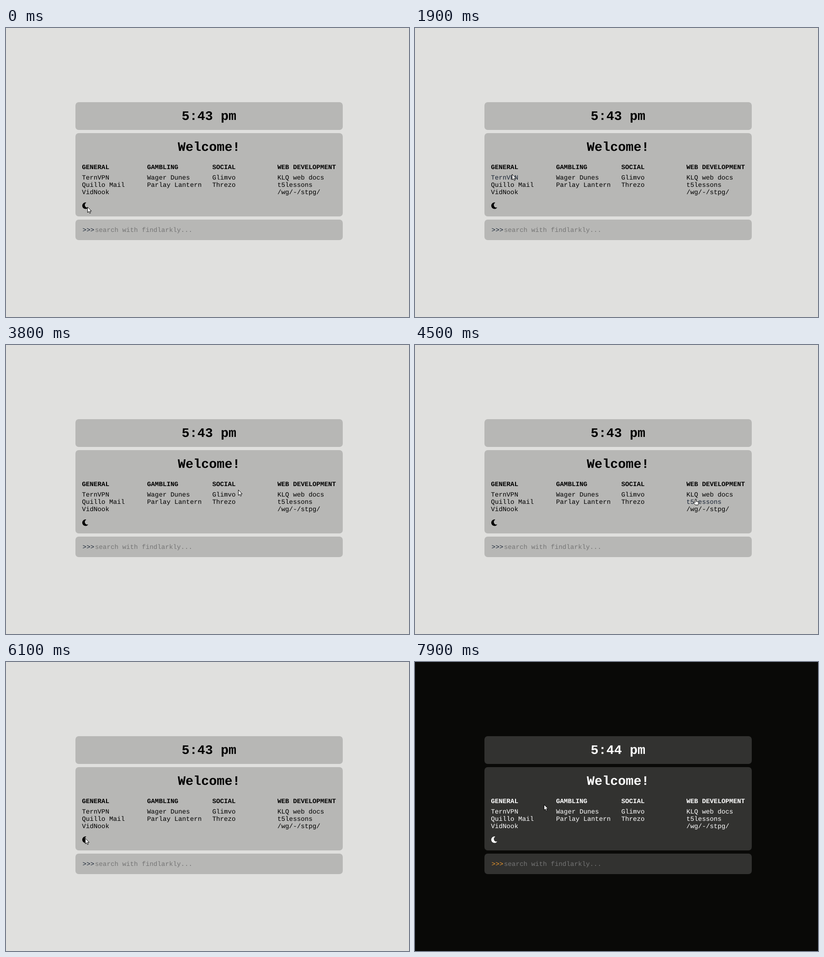
Animation of 882 by 635 pixels, one loop 8 s. Source, as an HTML page:

```html
<!DOCTYPE html>
<html lang="en">
<head>
<meta charset="utf-8">
<title>Start page</title>
<style>
  html, body { margin: 0; width: 100%; height: 100%; overflow: hidden; }
  svg {
    --bg: #e0e0de; --box: #b7b7b5; --ink: #000; --accent: #1a2536;
    display: block; background: var(--bg); fill: var(--ink);
    font: 14.222px "Liberation Mono", monospace;
    text-rendering: geometricPrecision;
  }
  svg.dark { --bg: #090907; --box: #323230; --ink: #fff; --accent: #f09a2c; }
  .box { fill: var(--box); }
  .big { font-size: 28.444px; font-weight: bold; text-anchor: middle; }
  .head { font-weight: bold; }
  .hover, .prompt { fill: var(--accent); }
  .hint { fill: #757575; }
  .cursor { fill: #fff; stroke: #000; stroke-linejoin: round; }
</style>
</head>
<body>
<svg id="stage" width="882" height="635" viewBox="0 0 882 635">
  <rect class="box" x="152" y="163" width="585" height="61" rx="7.1"/>
  <rect class="box" x="152" y="231" width="585" height="183" rx="7.1"/>
  <rect class="box" x="152" y="421" width="585" height="45" rx="7.1"/>
  <text id="clock" class="big" x="444.3" y="202">5:43 pm</text>
  <text class="big" x="444.3" y="270">Welcome!</text>
  <g id="columns"></g>
  <path transform="translate(166.1 383.3) scale(.02778)"
    d="M283 512c79 0 151-36 199-95 7-9-1-21-12-19-124 24-238-72-238-197 0-72 39-139 102-174 9-6 7-21-4-23A258 258 0 0 0 283 0a256 256 0 0 0 0 512z"/>
  <text class="prompt" x="167.6" y="448">&gt;&gt;&gt;</text>
  <text class="hint" x="194.8" y="448">search with findlarkly...</text>
  <g id="pointer" class="cursor">
    <path id="arrow" d="M0 0V12L2.8 9.5L4.7 13.7L6.7 12.8L4.9 8.7H8.6Z"/>
    <path id="hand" d="M-1.5 7V.6Q-1.5-.6-.3-.6T.9 .6V4.2L5.3 5.1Q6.6 5.5 6.5 7L5.9 9.6L5 12H-.8L-4.4 7.8Q-5 6.6-3.9 6.1Q-3 5.8-1.5 7Z"/>
  </g>
</svg>
<script>
const LOOP = 8000, DARK_AT = 6600, MINUTE_AT = 7900;
const CHAR = 8.534, ROW = 16, LEFT = 166.2, COLUMN = 142.6;

const columns = [
  ["GENERAL", "TernVPN", "Quillo Mail", "VidNook"],
  ["GAMBLING", "Wager Dunes", "Parlay Lantern"],
  ["SOCIAL", "Glimvo", "Threzo"],
  ["WEB DEVELOPMENT", "KLQ web docs", "t5lessons", "/wg/-/stpg/"]
];

// turning points of the pointer: time, x, y
const path = [
  [0, 178, 393], [1200, 178, 393], [1800, 207, 339], [1900, 212, 321],
  [2100, 236, 313], [3000, 377, 358], [3900, 525, 317], [4400, 607, 337.5],
  [4500, 614, 339], [4800, 632, 360], [5700, 197, 403], [6100, 173, 387],
  [6700, 173, 387], [7000, 182, 376], [7200, 200, 343], [7700, 235, 318],
  [7800, 235, 318], [7900, 282, 313]
];

const $ = id => document.getElementById(id);
const links = [];

function addText(x, y, str, cls) {
  const el = document.createElementNS("http://www.w3.org/2000/svg", "text");
  el.setAttribute("x", x);
  el.setAttribute("y", y);
  if (cls) el.setAttribute("class", cls);
  el.textContent = str;
  $("columns").append(el);
  return el;
}

columns.forEach(([title, ...items], c) => {
  const x = LEFT + c * COLUMN;
  addText(x, 310, title, "head");
  items.forEach((str, i) => {
    const y = 333 + i * ROW;
    links.push({ el: addText(x, y, str), x, right: x + str.length * CHAR, top: y - 12 });
  });
});

const slope = (i, k) => {
  const a = path[i], b = path[i + 1];
  return a && b ? (b[k] - a[k]) / (b[0] - a[0]) : 0;
};

// smooth through a point, at rest where the direction turns
function tangent(i, k) {
  const before = slope(i - 1, k), after = slope(i, k);
  if (before * after <= 0) return 0;
  const h0 = path[i][0] - path[i - 1][0], h1 = path[i + 1][0] - path[i][0];
  return (before * h1 + after * h0) / (h0 + h1);
}

function pointerAt(t) {
  const i = Math.min(path.findLastIndex(p => p[0] <= t), path.length - 2);
  const a = path[i], b = path[i + 1];
  const h = b[0] - a[0], f = (t - a[0]) / h, g = 1 - f;
  return [1, 2].map(k =>
    a[k] + (b[k] - a[k]) * f * f * (3 - 2 * f) +
    h * f * g * (tangent(i, k) * g - tangent(i + 1, k) * f));
}

const linkAt = ([x, y]) =>
  links.find(l => x >= l.x && x <= l.right && y >= l.top && y < l.top + ROW);

function draw(time) {
  const now = time % LOOP;
  const step = now >= DARK_AT && now < 7400 ? 200 : 100;
  const t = Math.floor(now / step) * step;
  const pos = pointerAt(t), link = linkAt(pos);
  // the hand appears one step after the link lights up
  const hand = link && link === linkAt(pointerAt(Math.max(0, t - step)));

  $("stage").classList.toggle("dark", t >= DARK_AT);
  $("clock").textContent = t >= MINUTE_AT ? "5:44 pm" : "5:43 pm";
  for (const l of links) l.el.classList.toggle("hover", l === link);
  $("pointer").setAttribute("transform", `translate(${pos.map(v => Math.floor(v) + .5)})`);
  $("arrow").style.display = hand ? "none" : "";
  $("hand").style.display = hand ? "" : "none";
}

function tick() {
  draw(performance.now());
  requestAnimationFrame(tick);
}
tick();
</script>
</body>
</html>
```
